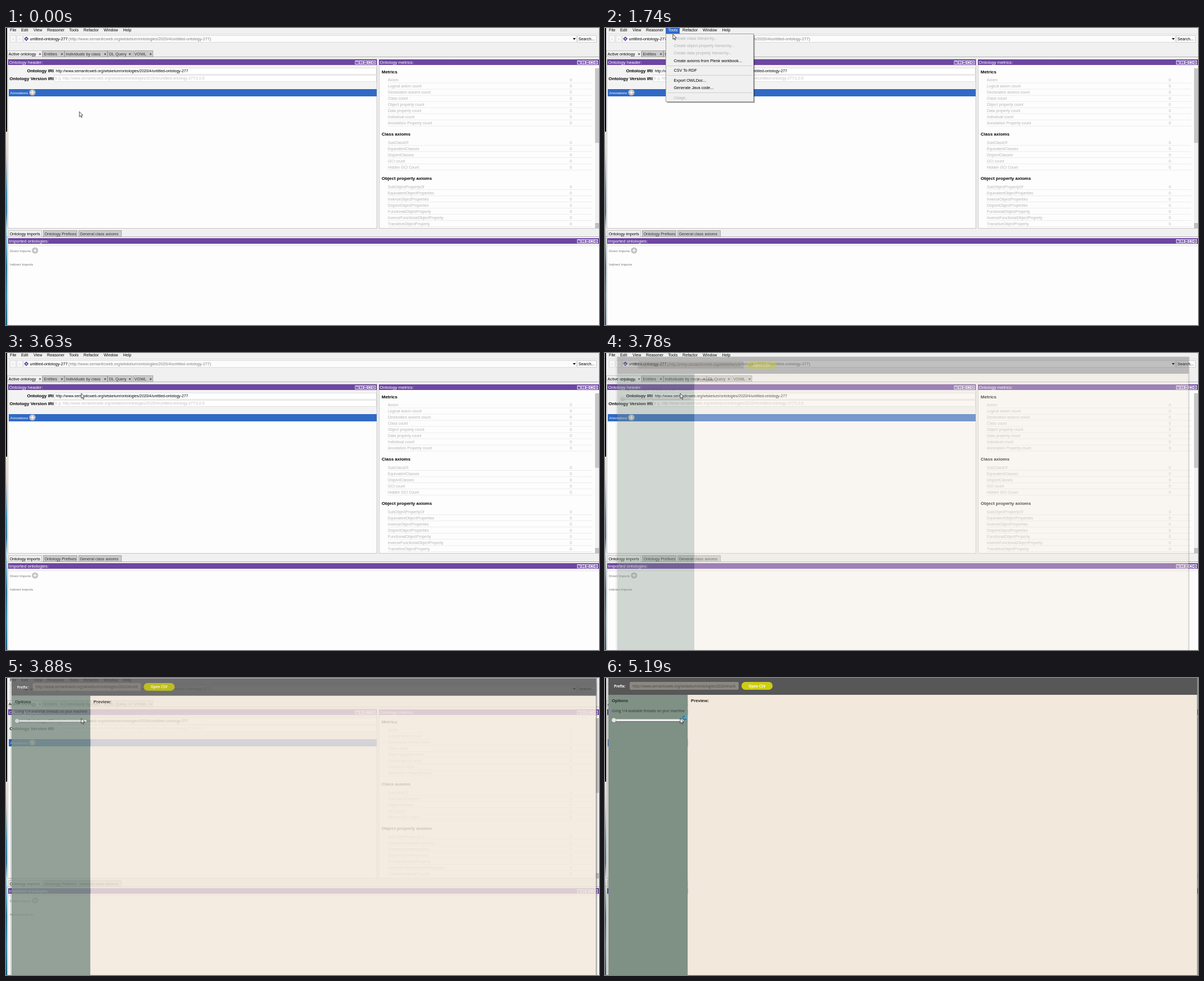
Write an HTML page with a canvas that moves like this. It is 1056 px wide and 530 px high and loops after 5.24 s.

```html
<!DOCTYPE html>
<html lang="en">
<head>
<meta charset="utf-8">
<title>Ontology editor: CSV to RDF</title>
<style>
  html, body { margin: 0; width: 100%; height: 100%; overflow: hidden; background: #f0f0f0; }
  canvas { display: block; }
</style>
</head>
<body>
<canvas id="stage" width="1056" height="530"></canvas>
<script>
const ctx = document.getElementById('stage').getContext('2d');
const LOOP = 5240;
const SANS = '"Liberation Sans", Arial, sans-serif';
const UI = '"Open Sans", "Noto Sans", sans-serif';
const PURPLE = '#6d46a2', BLUE = '#316ac5', FACE = '#f0f0f0';
const IRI_BASE = 'http://www.semanticweb.org/wtskelum/ontologies/2020/4/';
const NAME = 'untitled-ontology-277';

// ---------- drawing helpers ----------
function rect(x, y, right, bottom, fill, border) {
  ctx.fillStyle = fill;
  ctx.fillRect(x, y, right - x, bottom - y);
  if (border) {
    ctx.strokeStyle = border;
    ctx.lineWidth = 1;
    ctx.strokeRect(x + .5, y + .5, right - x - 1, bottom - y - 1);
  }
}

// y is the middle of the capital letters
function text(str, x, y, { size = 7.2, color = '#000', bold = false, align = 'left', family = SANS } = {}) {
  ctx.font = `${bold ? 'bold ' : ''}${size}px ${family}`;
  ctx.fillStyle = color;
  ctx.textAlign = align;
  ctx.fillText(str, x, y + size * .36);
}

function line(points, color, width = 1) {
  ctx.beginPath();
  points.forEach(([x, y]) => ctx.lineTo(x, y));
  ctx.strokeStyle = color;
  ctx.lineWidth = width;
  ctx.stroke();
}

function shape(points, fill) {
  ctx.beginPath();
  points.forEach(([x, y]) => ctx.lineTo(x, y));
  ctx.closePath();
  ctx.fillStyle = fill;
  ctx.fill();
}

function disc(x, y, r, fill) {
  ctx.beginPath();
  ctx.arc(x, y, r, 0, 7);
  ctx.fillStyle = fill;
  ctx.fill();
}

function pill(x, y, right, bottom, r, fill) {
  ctx.beginPath();
  ctx.roundRect(x, y, right - x, bottom - y, r);
  ctx.fillStyle = fill;
  ctx.fill();
}

function addButton(x, y) {
  disc(x, y, 5.6, '#c2c2c2');
  line([[x - 3, y], [x + 3, y]], '#fff', 1.4);
  line([[x, y - 3], [x, y + 3]], '#fff', 1.4);
}

// ---------- main window ----------
function desktopStrip() {
  const g = ctx.createLinearGradient(0, 185, 0, 530);
  [[0, '#efe6d2'], [.12, '#d8cdc9'], [.22, '#8fa9b5'], [.32, '#3386ab'], [.42, '#2a7297'],
   [.5, '#b9d3df'], [.58, '#6fb0cc'], [.7, '#176a8c'], [.85, '#2b87aa'], [1, '#0d5c7b']]
    .forEach(([at, color]) => g.addColorStop(at, color));
  rect(0, 0, 2, 185, '#000');
  rect(0, 185, 2, 530, g);
}

function tab(label, x, right, y, active, closable) {
  rect(x, y, right, y + 12, active ? FACE : '#cbcbcb', active ? '#c4c4c4' : '#a3a3a3');
  text(label, x + 2.5, y + 6, { color: active ? '#000' : '#333' });
  if (closable) text('×', right - 6.5, y + 6, { size: 7, bold: true, color: '#333' });
}

function panelHeader(title, x, right, y) {
  rect(x, y, right, y + 10, PURPLE);
  text(title, x + 1.5, y + 5, { size: 7.8, color: '#fff' });
  for (let i = 0; i < 5; i++) {
    const left = right - 38.5 + i * 7.5, cx = left + 3, cy = y + 5.5;
    ctx.strokeStyle = '#fff';
    ctx.lineWidth = .9;
    ctx.strokeRect(left, y + 2.5, 6, 6);
    if (i === 0) text('?', cx, cy, { size: 5.5, bold: true, color: '#fff', align: 'center' });
    if (i === 1) line([[cx, cy - 3], [cx, cy + 3]], '#fff');
    if (i === 2) line([[cx - 3, cy], [cx + 3, cy]], '#fff');
    if (i === 3) rect(cx - 1.6, cy - 1.6, cx + 1.6, cy + 1.6, '#fff');
    if (i === 4) {
      line([[cx - 2, cy - 2], [cx + 2, cy + 2]], '#fff');
      line([[cx - 2, cy + 2], [cx + 2, cy - 2]], '#fff');
    }
  }
}

const MENUS = [['File', 7], ['Edit', 27], ['View', 49], ['Reasoner', 73], ['Tools', 112.5],
               ['Refactor', 138], ['Window', 174], ['Help', 208.5]];

const METRICS = [
  ['Metrics', 78, ['Axiom', 'Logical axiom count', 'Declaration axioms count', 'Class count',
    'Object property count', 'Data property count', 'Individual count', 'Annotation Property count']],
  ['Class axioms', 189.5, ['SubClassOf', 'EquivalentClasses', 'DisjointClasses', 'GCI count', 'Hidden GCI Count']],
  ['Object property axioms', 268.5, ['SubObjectPropertyOf', 'EquivalentObjectProperties',
    'InverseObjectProperties', 'DisjointObjectProperties', 'FunctionalObjectProperty',
    'InverseFunctionalObjectProperty', 'TransitiveObjectProperty']]
];

function metricsPanel() {
  panelHeader('Ontology metrics:', 664, 1056, 56);
  rect(664, 66, 1056, 358, '#fdfdfd');
  line([[664.5, 66], [664.5, 357.5], [1056, 357.5]], '#c8c8c8');
  for (const [title, y, rows] of METRICS) {
    text(title, 669, y, { size: 8, bold: true });
    rows.forEach((label, i) => {
      const rowY = y + 14.8 + i * 11;
      text(label, 680, rowY, { size: 6.8, color: '#b4b4b4' });
      text('0', 1004, rowY, { size: 6.8, color: '#b4b4b4' });
      line([[680, rowY + 5.2], [1044, rowY + 5.2]], '#ececec');
    });
  }
  rect(1049, 71, 1056, 357, '#f0f0f0');
  rect(1049, 72, 1056, 205, '#c6c6c6');
  rect(1049, 348, 1056, 357, '#c0c0c0');
}

function mainWindow() {
  rect(0, 0, 1056, 530, FACE);
  desktopStrip();
  MENUS.forEach(([label, x]) => text(label, x, 3));

  // address bar
  rect(2, 10, 1056, 11, '#e2e2e2');
  rect(7, 13, 18, 26, '#f7f7f7', '#dedede');
  rect(19, 13, 30, 26, '#f7f7f7', '#dedede');
  text('<', 12.5, 19.5, { size: 6, color: '#c4c4c4', align: 'center' });
  text('>', 24.5, 19.5, { size: 6, color: '#c4c4c4', align: 'center' });
  rect(31, 13, 1016, 26, '#fcfcfc', '#dcdcdc');
  shape([[36.2, 15.2], [40.2, 19.2], [36.2, 23.2], [32.2, 19.2]], '#56358f');
  shape([[36.2, 17.4], [38, 19.2], [36.2, 21], [34.4, 19.2]], '#d8cce8');
  text(NAME, 42.5, 19.5);
  text(`(${IRI_BASE}${NAME})`, 111, 19.5, { color: '#808080' });
  shape([[1009.5, 18], [1014.5, 18], [1012, 21.2]], '#000');
  rect(1017, 13, 1052, 26, '#fbfbfb', '#d0d0d0');
  text('Search...', 1019.5, 19.5);

  // upper tabs
  line([[2, 51.5], [1056, 51.5]], '#b2b2b2');
  tab('Active ontology', 2, 65, 40, true, true);
  tab('Entities', 65, 104, 40, false, true);
  tab('Individuals by class', 104, 181, 40, false, true);
  tab('DL Query', 181, 225, 40, false, true);
  tab('VOWL', 226, 262, 40, false, true);

  // ontology header
  rect(3, 55, 661, 358, '#fdfdfd', '#c4c4c4');
  panelHeader('Ontology header:', 4, 660.5, 56);
  rect(4, 66, 660, 108, '#f3f3f3');
  rect(86, 71, 660, 83, '#fff', '#e2e2e2');
  rect(86, 84, 660, 96, '#fff', '#e2e2e2');
  text('Ontology IRI', 85, 76.5, { size: 8, bold: true, align: 'right' });
  text('Ontology Version IRI', 85, 90, { size: 8, bold: true, align: 'right' });
  text(IRI_BASE + NAME, 88.5, 76.8, { size: 6.8 });
  text(`e.g. ${IRI_BASE}${NAME}/1.0.0`, 87.5, 90, { size: 6.8, color: '#c0c0c0' });
  rect(5, 109, 660, 122, BLUE);
  text('Annotations', 7.5, 115.5, { size: 6, color: '#fff' });
  addButton(47, 115);

  metricsPanel();

  // imports
  line([[2, 372.5], [1056, 372.5]], '#b2b2b2');
  tab('Ontology imports', 4, 64, 361, true);
  tab('Ontology Prefixes', 66, 127, 361);
  tab('General class axioms', 129, 206, 361);
  rect(3, 374, 1056, 530, '#fdfdfd');
  rect(3, 374, 4, 530, '#c4c4c4');
  panelHeader('Imported ontologies:', 4, 1056, 375);
  rect(4, 386, 1056, 390, '#f4f4f4');
  text('Direct Imports', 7, 397.5, { size: 6, color: '#777' });
  addButton(51.7, 397);
  text('Indirect Imports', 7, 421.5, { size: 6, color: '#777' });
}

// ---------- Tools menu ----------
const TOOL_ITEMS = [
  ['Create class hierarchy...', 18.5, false], ['Create object property hierarchy...', 31.5, false],
  ['Create data property hierarchy...', 44.8, false], ['Create axioms from Plenk workbook...', 58, true],
  ['CSV To RDF', 75.5, true], ['Export OWLDoc...', 93, true],
  ['Generate Java code...', 106.3, true], ['Usage...', 124, false]
];

function toolsMenu(alpha, pointerY) {
  ctx.save();
  ctx.globalAlpha = alpha;
  rect(108, 0, 133, 10, BLUE);
  text('Tools', 112.5, 3, { color: '#fff' });
  rect(111, 13, 267, 134, 'rgba(0,0,0,.18)');
  rect(110, 12, 266, 133, 'rgba(0,0,0,.3)');
  rect(108, 10, 265, 132, FACE, '#a0a0a0');
  [67, 84, 115].forEach(y => line([[111, y + .5], [262, y + .5]], '#cfcfcf'));
  for (const [label, y, enabled] of TOOL_ITEMS) {
    const hot = enabled && Math.abs(pointerY - y) <= 6.6;
    if (hot) rect(109, Math.round(y - 6.7), 263, Math.round(y + 6.4), BLUE);
    text(label, 122.5, y, { color: hot ? '#fff' : enabled ? '#000' : '#b0b0b0' });
  }
  ctx.restore();
}

// ---------- CSV dialog ----------
function csvDialog(progress) {
  const rest = (1 - progress) ** 2, scale = 1 - .047 * rest;
  ctx.save();
  ctx.globalAlpha = 1 - rest;
  ctx.translate(530.5, 265);
  ctx.scale(scale, scale);
  ctx.translate(-530.5, -265);
  rect(3, -2, 6, 540, 'rgba(0,0,0,.14)');
  rect(1055, -2, 1057, 540, 'rgba(0,0,0,.3)');
  rect(6, -1.5, 1055, 30, '#575757');
  rect(6, 30, 147.5, 545, '#7f9085');
  rect(147.5, 30, 1055, 545, '#f2e8dc');
  line([[1054.7, -1], [1054.7, 545]], '#777', .7);

  text('Prefix:', 16, 14.5, { size: 6.3, bold: true, color: '#fff', family: UI });
  pill(44, 7, 238, 21, 2, '#8b8781');
  text(IRI_BASE + 'unti', 49, 14.3, { size: 6.25, color: '#4b4946', family: UI });
  pill(243, 7, 298.5, 21, 7, '#cdcd14');
  text('Open CSV', 270.7, 14.3, { size: 6.3, bold: true, color: '#fff', align: 'center', family: UI });

  text('Options', 12, 40.5, { size: 7.7, bold: true, color: '#222d28' });
  text('Preview:', 153, 40.5, { size: 7.8, bold: true, color: '#222' });
  text('Using 1/4 available threads on your machine', 12, 58.5, { size: 6.28, color: '#2c3833', family: UI });
  pill(12, 74, 141, 78, 2, '#66736b');
  pill(12, 73.5, 141, 77, 1.8, '#efefef');
  disc(15.8, 75.8, 4, '#69766e');
  disc(15.8, 75.3, 3.7, '#e6e6e6');
  ctx.restore();
}

// ---------- pointer ----------
function pointer(x, y) {
  const arrow = [[0, 0], [0, 9], [2, 7.2], [3.5, 10.5], [4.8, 9.9], [3.4, 6.7], [6.2, 6.5]]
    .map(([dx, dy]) => [x + dx, y + dy]);
  shape(arrow, '#fff');
  line([...arrow, arrow[0]], '#111', .75);
}

function busyRing(progress) {
  const x = 141.5, y = 71.5, start = progress * 5;
  const arc = (from, to, color) => {
    ctx.beginPath();
    ctx.arc(x, y, 3.1, from, to);
    ctx.strokeStyle = color;
    ctx.lineWidth = 2.1;
    ctx.stroke();
  };
  arc(0, 7, '#1a83c8');
  arc(start, start + 1.5, '#48aee6');
}

// ---------- timeline ----------
// Progress 0..1 in n equal jumps, the first at start and the last at end.
function stepped(t, start, end, n) {
  if (t < start) return 0;
  return Math.min(n, Math.floor((t - start) / (end - start) * (n - 1) + 1e-6) + 1) / n;
}

const smooth = p => p * p * (3 - 2 * p);
const linear = p => p;
const MOVES = [
  [290, 800, 12, 120, 15, smooth],
  [850, 1000, 4, 120.5, 7, linear],
  [1740, 2230, 12, 126, 56, linear],
  [2280, 2710, 10, 134, 72, linear]
];

function pointerAt(t) {
  let x = 130.7, y = 149.3;
  for (const [start, end, n, toX, toY, ease] of MOVES) {
    const p = ease(stepped(t, start, end, n));
    x += (toX - x) * p;
    y += (toY - y) * p;
  }
  return [x, y];
}

function draw(t) {
  const [x, y] = pointerAt(t);
  const menu = stepped(t, 1230, 1360, 3) - stepped(t, 3400, 3630, 3);
  const dialog = stepped(t, 3780, 3980, 5);
  const busy = stepped(t, 5060, 5190, 3);
  mainWindow();
  if (menu > 0) toolsMenu(menu, y);
  if (dialog) csvDialog(dialog);
  pointer(x, y);
  if (busy) busyRing(busy);
}

const began = performance.now();
function tick() {
  draw((performance.now() - began) % LOOP);
  requestAnimationFrame(tick);
}
tick();
</script>
</body>
</html>
```
